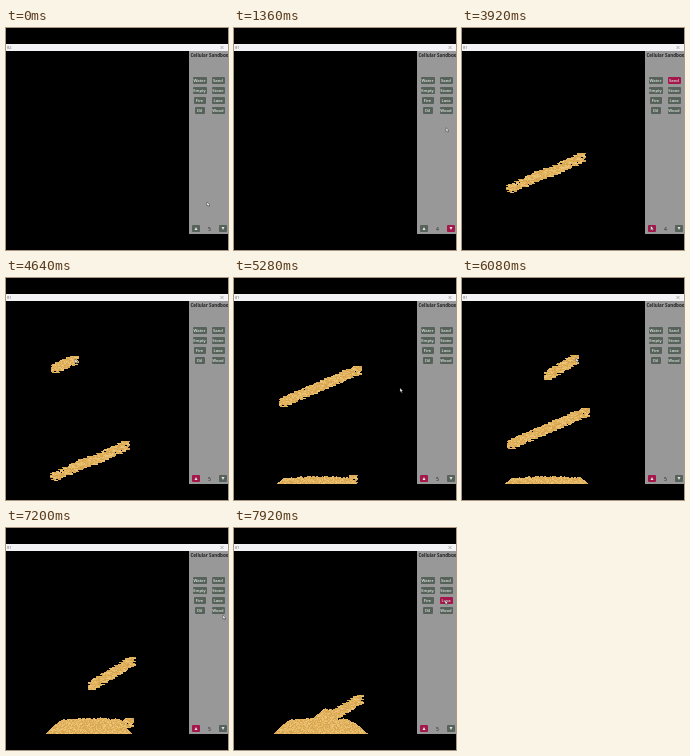
These frames come from a looping animation (222 px wide and 222 px high, 8000 ms). An HTML page with a canvas:

```html
<!DOCTYPE html>
<html lang="en">
<head>
<meta charset="utf-8">
<title>Cellular Sandbox</title>
<style>
  html, body { margin: 0; width: 100%; height: 100%; overflow: hidden; background: #000; }
  canvas, svg { position: absolute; left: 0; top: 0; width: 222px; height: 222px; }
  text { font-family: "Open Sans", "Liberation Sans", sans-serif; }
  .label { font-size: 4.1px; font-weight: 600; fill: #dfe5df; text-anchor: middle; }
  .btn rect { fill: #56625a; }
  .btn.on rect { fill: #a5174b; }
</style>
</head>
<body>
<canvas id="sand" width="222" height="222"></canvas>
<svg viewBox="0 0 222 222">
  <rect y="16" width="222" height="7" fill="#f3f3f5"/>
  <text id="fps" x="1" y="21" font-size="4" fill="#666">82</text>
  <path d="M214.5 18l3 3m0-3l-3 3" stroke="#888" stroke-width=".6"/>
  <rect x="183" y="23" width="39" height="183" fill="#989898"/>
  <text x="184.5" y="29.4" font-size="4.5" font-weight="700" fill="#222">Cellular Sandbox</text>
  <g id="buttons"></g>
  <text id="size" x="203.5" y="202.6" font-size="5" fill="#222" text-anchor="middle">5</text>
  <path id="cursor" d="M0 0v4l1-.8 .7 1.5 .7-.3-.7-1.5h1.3z" fill="#fff" stroke="#222" stroke-width=".4"/>
</svg>
<script>
const LOOP = 8000, SPEED = 0.053, FLOOR = 205, STAMP = 30;
const FIRST_CLICK = 1000, PICK_SAND = 1580, LAST_CLICK = 4000;
const $ = id => document.getElementById(id);
const ctx = $('sand').getContext('2d');

// Pointer stops: time, x, y; a fourth value pours sand on the way there at that density
const stops = [
  [0, 201, 174], [FIRST_CLICK, 214, 199], [PICK_SAND, 211, 53],
  [2410, 48, 80], [3030, 121, 81, .5], [LAST_CLICK, 190, 200],
  [4480, 49, 81], [5110, 127, 81, .64], [5280, 166, 110],
  [5760, 86, 80], [6220, 126, 80, .6], [6560, 221, 98], [LOOP, 211, 72]
];
const shades = ['#e2b25c', '#d8a650', '#ebc377'];

function pointer(t) {
  const i = Math.max(1, stops.findIndex(s => s[0] >= t));
  const [t0, x0, y0] = stops[i - 1], [t1, x1, y1, pouring] = stops[i];
  let k = (t - t0) / (t1 - t0);
  if (!pouring) k *= k * (3 - 2 * k);
  return [x0 + (x1 - x0) * k, y0 + (y1 - y0) * k];
}

let seed = 71;
function rand() {
  seed = (seed + 0x6D2B79F5) | 0;
  let r = Math.imul(seed ^ seed >>> 15, 1 | seed);
  r ^= r + Math.imul(r ^ r >>> 7, 61 | r);
  return ((r ^ r >>> 14) >>> 0) / 4294967296;
}

// Every grain falls at one speed, so "row" is its height carried back to time 0
function pour() {
  const grains = new Map();
  const stamp = (t, density) => {
    const [cx, cy] = pointer(t).map(Math.round);
    for (let x = cx - 3; x <= cx + 3; x++) for (let y = cy - 4; y <= cy + 4; y++) {
      if (rand() > density) continue;
      const row = Math.round(y - SPEED * t), key = x + ',' + row;
      if (!grains.has(key)) grains.set(key, { x, row, born: t, shade: shades[rand() * 3 | 0] });
    }
  };
  stops.forEach(([end, , , density], i) => {
    if (!density) return;
    for (let t = stops[i - 1][0] + 1; t <= end; t += STAMP) stamp(t, density);
  });
  return [...grains.values()];
}

// Lowest grains land first and roll diagonally until they find a hollow
function settle(grains) {
  const height = new Array(222).fill(0);
  for (const g of grains.sort((a, b) => b.row - a.row)) {
    let x = g.x;
    for (;;) {
      const side = rand() < .5 ? -1 : 1;
      if (height[x + side] < height[x]) x += side;
      else if (height[x - side] < height[x]) x -= side;
      else break;
    }
    g.restX = x;
    g.restY = FLOOR - height[x]++;
  }
  return grains;
}
const grains = settle(pour());

const buttons = {};
function addButton(name, cx, y, w, face) {
  const x = Math.round(cx - w / 2), h = 7;
  $('buttons').insertAdjacentHTML('beforeend',
    `<g class="btn"><rect x="${x}" y="${y}" width="${w}" height="${h}" rx="1"/>${face}</g>`);
  buttons[name] = { x, y, w, h, el: $('buttons').lastElementChild };
}
['Water', 'Sand', 'Empty', 'Stone', 'Fire', 'Lava', 'Oil', 'Wood'].forEach((name, i) => {
  const right = i % 2, cx = right ? 212 : 193.5, y = 49 + 10 * (i >> 1);
  const w = right ? 13 : 2 * name.length + 4;
  addButton(name, cx, y, w, `<text class="label" x="${cx}" y="${y + 5}">${name}</text>`);
});
addButton('up', 190, 197, 8, '<path d="M188.5 202h3l-1.5-3z" fill="#dfe5df"/>');
addButton('down', 217, 197, 8, '<path d="M215.5 199h3l-1.5 3z" fill="#dfe5df"/>');

function focused(t) {
  if (t < FIRST_CLICK) return '';
  if (t < PICK_SAND) return 'down';
  return t < LAST_CLICK ? 'Sand' : 'up';
}

// Falling grains smear sideways into short streaks
function drawSand(t) {
  ctx.clearRect(0, 0, 222, 222);
  for (const g of grains) {
    if (t < g.born) continue;
    const y = Math.round(g.row + SPEED * t);
    ctx.fillStyle = g.shade;
    if (y < g.restY) ctx.fillRect(g.x - 1, y, 3, 1);
    else ctx.fillRect(g.restX, g.restY, 1, 1);
  }
}

function draw(t) {
  drawSand(t);
  const [px, py] = pointer(t);
  $('cursor').setAttribute('transform', `translate(${px.toFixed(2)} ${py.toFixed(2)})`);
  for (const [name, b] of Object.entries(buttons)) {
    const hover = px >= b.x && px <= b.x + b.w && py >= b.y && py <= b.y + b.h;
    b.el.classList.toggle('on', hover || name === focused(t));
  }
  $('size').textContent = t >= FIRST_CLICK && t < LAST_CLICK ? 4 : 5;
  $('fps').textContent = t < FIRST_CLICK ? 82 : 81;
}

function tick() {
  draw(performance.now() % LOOP);
  requestAnimationFrame(tick);
}
tick();
</script>
</body>
</html>
```
